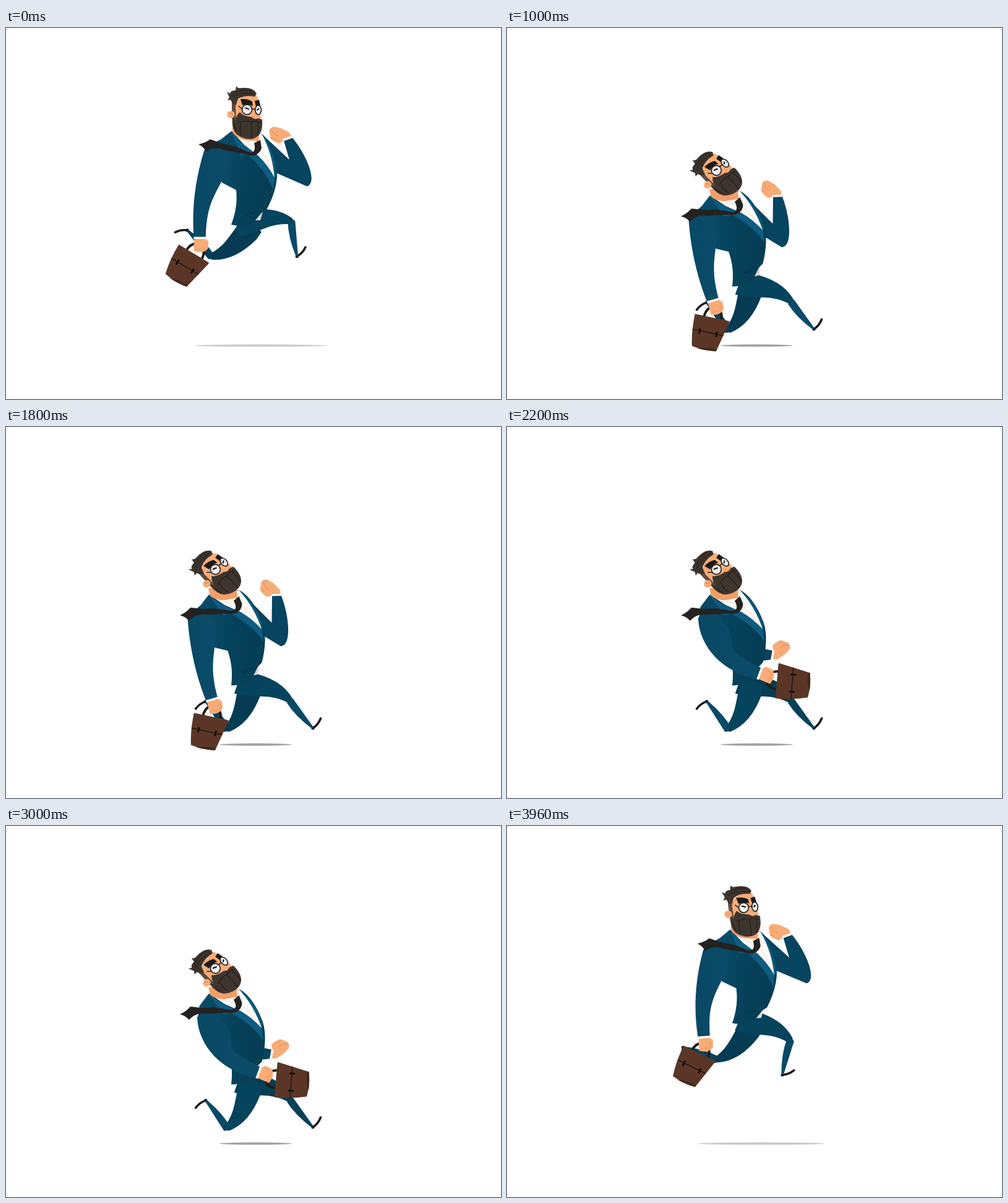
An HTML page for the animation above (4 s loop, 800 by 600 pixels).

```html
<!DOCTYPE html>
<html lang="en">
<head>
<meta charset="utf-8">
<title>Running businessman</title>
<style>
html, body { margin: 0; width: 100%; height: 100%; overflow: hidden; background: #fff; }
svg { display: block; width: 100%; height: 100%; }
</style>
</head>
<body>
<svg viewBox="0 0 800 600">
  <defs>
    <linearGradient id="coat" x1="0" x2="1" y1="0" y2=".3">
      <stop offset="0" stop-color="#0a506e"/><stop offset=".5" stop-color="#06435c"/><stop offset="1" stop-color="#053d54"/>
    </linearGradient>
    <linearGradient id="sleeve" x1="0" x2="1" y1="0" y2="0">
      <stop offset="0" stop-color="#084865"/><stop offset="1" stop-color="#0a4c69"/>
    </linearGradient>
  </defs>
  <ellipse id="shadow" cy="513.6" ry="2"/>

  <g id="farHand">
    <path fill="#f7ac78" d="M-7 3L-6 10L4 21L14 27Q20 29 24 23L26 11Q22 3 15 -1L7 1Z"/>
    <path fill="none" stroke="#e2905c" d="M20 24Q19 14 12 11M25 12L20 9"/>
    <path fill="#fff" d="M-8.500 -1H8V3.500H-8.500Z"/>
  </g>
  <path id="farArm" fill="#06445f"/>

  <g id="farLeg"></g>
  <g id="nearLeg"></g>

  <g id="torso">
    <path fill="#dcd9d3" d="M401 311L411 311L415 298L406 300Z"/>
    <path fill="url(#coat)" d="M364 167L345 182L338 200L349 250L372 262C374 282 371 300 364 318C380 322 394 319 403 311L413 299L421 294C433 272 439 250 438 232C435 205 426 181 413 171Z"/>
    <path fill="#fdfbf8" d="M368 170L385 189L408 207L434 243C434 222 428 190 413 171L390 176Z"/>
    <path fill="none" stroke="#e8d3bd" stroke-width=".8" d="M410 195Q422 212 432 237M386 184L404 192"/>
    <path fill="#f29f68" d="M366 157L366 169Q375 181 393 182L408 183L412 160Z"/>
    <path fill="#0f5c82" d="M364 167L379 205L392 206Q420 231 432 262L434 242Q423 221 407 206Q385 194 364 167Z"/>
    <path fill="#0d587b" d="M413 171Q431 203 434 244L437 236Q434 195 413 171Z"/>
    <path fill="none" stroke="#03283a" stroke-width="1.2" d="M386 302Q395 302 402 298"/>
  </g>

  <g id="head">
    <path fill="#f7ac78" d="M367 122L384 109L405 109Q411 122 412 147L396 155L368 150Z"/>
    <path fill="#5b4b40" d="M365 114L376 111L371 127L372 147L365 147Z"/>
    <path fill="#3c332d" d="M366 122L363 116L358 117L361 112L357 103L362 106Q363 101 371 101L372 94Q375 98 380 97Q399 95 405 106L402 111Q386 108 376 114Q372 118 371 124Z"/>
    <path fill="none" stroke="#211c19" stroke-width=".9" d="M366 110Q378 103 402 107M370 104Q385 98 398 102"/>
    <path fill="#3f352f" d="M366 144L371 148C373 142 375 138 378 136C383 142 390 143 397 144Q402 149 407 146L414 148C415 161 413 173 402 178C393 182 380 178 372 171C366 164 365 153 366 144Z"/>
    <path fill="none" stroke="#1d1916" stroke-width="1.1" d="M380 154Q377 162 380 173M396 153Q398 166 396 179M407 152Q409 163 406 174M376 153Q389 149 397 152Q404 149 412 154M369 154Q369 161 372 167"/>
    <path fill="#f7ac78" d="M397 134Q403 140 406 143Q402 147 397 144Z"/>
    <path fill="#1c1a19" d="M379 115Q390 114 398 119L399 126Q390 122 382 125ZM402 118L409 116L411 125L404 127Z"/>
    <path fill="none" stroke="#222" stroke-width="1.5" d="M381 131L376 126M397 132Q400 130 403 132"/>
    <g fill="#eceef0" stroke="#202020" stroke-width="1.7">
      <circle cx="389.5" cy="132" r="8"/><ellipse cx="407.7" cy="132.5" rx="4.8" ry="7.6"/>
    </g>
    <path stroke="#222" stroke-width="2.2" d="M386.500 129L393 131.500M405.500 133L409 130"/>
    <ellipse cx="363.5" cy="140" rx="6.3" ry="6" fill="#f7ac78"/>
    <path fill="none" stroke="#e78f5a" stroke-width="1.4" d="M361 138Q365 136 366 142"/>
  </g>

  <g id="bag">
    <path fill="none" stroke="#211b18" stroke-width="4" d="M-18 13Q-17 -5 -4 -6Q10 -5 11 13"/>
    <path fill="#5b3627" d="M-33 13Q-34 11 -31 11L22 11Q25 11 24 14L13 63Q-7 67 -27 63Q-33 40 -33 13Z"/>
    <path fill="#3f2a20" d="M-17 65Q-6 59 13 60L13 63Q-2 66 -17 65Z"/>
    <path fill="none" stroke="#1b1310" stroke-width="1.4" d="M-32 36L19 36"/>
    <path fill="none" stroke="#15100e" stroke-width="3" d="M-20 32V41M8 32V41"/>
  </g>
  <g id="nearHand">
    <path fill="#f7ac78" d="M-9 2L8 2L14 8L13 19Q8 26 -2 25L-10 23Z"/>
    <path fill="none" stroke="#e8965f" d="M11 11Q6 17 9 21M-8 21Q0 18 7 21"/>
    <path fill="#fff" d="M-10 -1H10V3.500H-10Z"/>
  </g>
  <path id="nearArm" fill="url(#sleeve)"/>
  <path id="tie" fill="#232221" d="M401 186L411 181L413 194C410 204 402 208 392 206C376 200 366 201 352 197C341 193 333 194 323 200C321 195 317 191 311 188C317 187 325 184 330 180C338 182 346 187 360 189C374 191 385 199 394 201C401 202 404 197 401 186Z"/>
</svg>
<script>
const CYCLE = 800, STEP = 40, RAD = Math.PI / 180;
const $ = id => document.getElementById(id);

// Angles in degrees from straight down, forward positive.
const legKeys = { // time: thigh, shin, toe
  0: [97, 8, 133], 160: [86, 36, 137], 200: [74, 39, 137], 360: [-42, -111, 0],
  400: [-50, -139, -85], 560: [-39, -117, 3], 600: [-25, -144, -58], 760: [71, -14, 107]
};
const nearKeys = { // time: upper arm, forearm, bag turn, arm length
  0: [-17, 0, 31, 1.03], 200: [6, 17, 12, .96], 400: [10, 86, -112, 1],
  560: [20, 79, -104, 1], 600: [15, 70, -85, 1], 760: [-15, 5, 26, 1.03]
};
const farKeys = { // time: upper arm, forearm
  0: [47, 200], 200: [40, 182], 400: [-40, 30], 560: [-31, 66], 600: [-20, 80], 760: [48, 200]
};

// Periodic monotone cubic through the keys.
function sample(keys, t) {
  const times = Object.keys(keys).map(Number), n = times.length;
  t = (t % CYCLE + CYCLE) % CYCLE;
  const time = i => times[(i + n) % n] + Math.floor(i / n) * CYCLE;
  let i = n - 1;
  while (times[i] > t) i--;
  const h = time(i + 1) - time(i), s = (t - time(i)) / h;
  return keys[0].map((_, c) => {
    const val = j => keys[times[(j + n) % n]][c];
    const slope = j => (val(j + 1) - val(j)) / (time(j + 1) - time(j));
    const tangent = j => {
      const p = slope(j - 1), q = slope(j);
      return p * q > 0 ? 2 * p * q / (p + q) : 0;
    };
    const r = 1 - s;
    return val(i) * r * r * (1 + 2 * s) + val(i + 1) * s * s * (3 - 2 * s)
      + h * s * r * (r * tangent(i) - s * tangent(i + 1));
  });
}

const dir = a => [Math.sin(a * RAD), Math.cos(a * RAD)];
const nrm = a => [Math.cos(a * RAD), -Math.sin(a * RAD)];
// Point reached from p by going `along` the angle and `across` to its front side.
const go = (p, a, along, across = 0) => {
  const d = dir(a), n = nrm(a);
  return [p[0] + d[0] * along + n[0] * across, p[1] + d[1] * along + n[1] * across];
};
const path = (...parts) => parts.map(p => typeof p === "string" ? p : p.map(v => v.toFixed(1)).join(" ")).join(" ");
const place = (id, p, turn) => $(id).setAttribute("transform", `translate(${p[0]} ${p[1]}) rotate(${turn})`);

function drawLeg(id, hip, [a, b, c], thighFill, shinFill) {
  const knee = go(hip, a, 75), foot = go(knee, b, 57);
  const thigh = path("M", go(hip, a, -14, 22), "L", go(hip, a, 0, 26), "Q", go(hip, a, 50, 30), go(knee, a, 1, 5),
    "L", go(knee, a, 0, -5), "C", go(hip, a, 40, 4), go(hip, a, 20, -13), go(hip, a, -16, -14), "Z");
  const shin = path("M", go(knee, a, 0, 5), "L", go(knee, b, 0, 5), "L", go(foot, b, 0, 1.6), "L", go(foot, b, 0, -1.8),
    "Q", go(knee, b, 24, -10), go(knee, b, -1, -7), "Z");
  const toe = go(foot, c, 20, 1.5);
  const sole = path("M", foot, "Q", go(foot, c, 10, -2.5), toe);
  $(id).innerHTML = `<path d="${sole}" fill="none" stroke="#191716" stroke-width="3.6" stroke-linecap="round"/>
    <circle cx="${foot[0]}" cy="${foot[1]}" r="2.6" fill="#191716"/>
    <path d="${shin}" fill="${shinFill}"/><path d="${thigh}" fill="${thighFill}"/>`;
}

function drawFarArm(s, top, [a, b]) {
  const e = go(s, a, 81), w = go(e, b, 69);
  const na = nrm(a), nb = nrm(b);
  const m = [(na[0] + nb[0]) / 2, (na[1] + nb[1]) / 2];
  const len = Math.max(Math.hypot(...m), .2);
  const off = k => [e[0] + m[0] * k, e[1] + m[1] * k];
  const mid = [(e[0] + w[0]) / 2, (e[1] + w[1]) / 2];
  $("farArm").setAttribute("d", path("M", top, "L", off(9 / len / len), "L", go(w, b, 0, 7),
    "L", go(w, b, 0, -8), "C", go(mid, b, 0, -20), go(e, b, -13, -22), off(-13 / len), "L", go(s, a, 0, -36), "Z"));
  place("farHand", w, -b);
}

function drawNearArm(s, top, neck, [a, b, turn, length], front) {
  const e = go(s, a, (72 - 12 * front) * length), w = go(e, b, (60 + 12 * front) * length);
  $("nearArm").setAttribute("d", path("M", top, "Q", [s[0] - 8, s[1] - 16], [s[0] - 15, s[1] - 6],
    "C", go(e, a, -25, -16 - 7 * front), go(e, b, 15, -13 - 5 * front), go(w, b, 0, -10), "L", go(w, b, 0, 9.5),
    "C", go(e, b, 20, 11 + 6 * front), go(e, a, 0, 18 + 10 * front), go(s, a, 40, 25 + 6 * front),
    "L", go(s, a, 18, 30), "L", neck, "Z"));
  place("nearHand", w, -b);
  place("bag", go(w, b, 20), turn);
}

function draw(now) {
  const t = Math.floor(now / STEP) * STEP % CYCLE;
  const half = t % 400, u = Math.min(half, 400 - half) / 200;
  const ease = u * u * (3 - 2 * u), tilt = (ease + u) / 2;
  const drop = 100 * u ** 3, lean = -14 * ease;

  // Torso leans about the back corner of the jacket hem.
  const body = `translate(0 ${drop}) rotate(${lean} 364 318)`;
  const onBody = (x, y) => go([364, 318 + drop], -lean, y - 318, x - 364);
  $("torso").setAttribute("transform", body);
  $("tie").setAttribute("transform", body);
  $("head").setAttribute("transform",
    `translate(${-39 * tilt} ${drop + 14 * tilt}) rotate(${-42 * tilt} 363 140)`);

  const hip = [388, 322 + drop];
  drawLeg("farLeg", hip, sample(legKeys, t + 400), "#053c53", "#06415a");
  drawLeg("nearLeg", hip, sample(legKeys, t), "#06435d", "#084a67");

  drawFarArm(onBody(420, 190), onBody(414, 172), sample(farKeys, t));
  const arm = sample(nearKeys, t);
  const front = Math.min(1, Math.max(0, (arm[1] - 17) / 55));
  const shoulder = onBody(335, 205);
  shoulder[0] += 16 * front;
  drawNearArm(shoulder, onBody(352, 178), onBody(362, 192), arm, front);

  const wide = 1 - ease, gray = 163 + 42 * wide;
  const shadow = $("shadow");
  shadow.setAttribute("cx", 403.5 + 8.5 * wide);
  shadow.setAttribute("rx", 58.5 + 49.5 * wide);
  shadow.setAttribute("fill", `rgb(${gray},${gray},${gray})`);
}

const start = performance.now();
function loop() {
  draw(performance.now() - start);
  requestAnimationFrame(loop);
}
loop();
</script>
</body>
</html>
```
